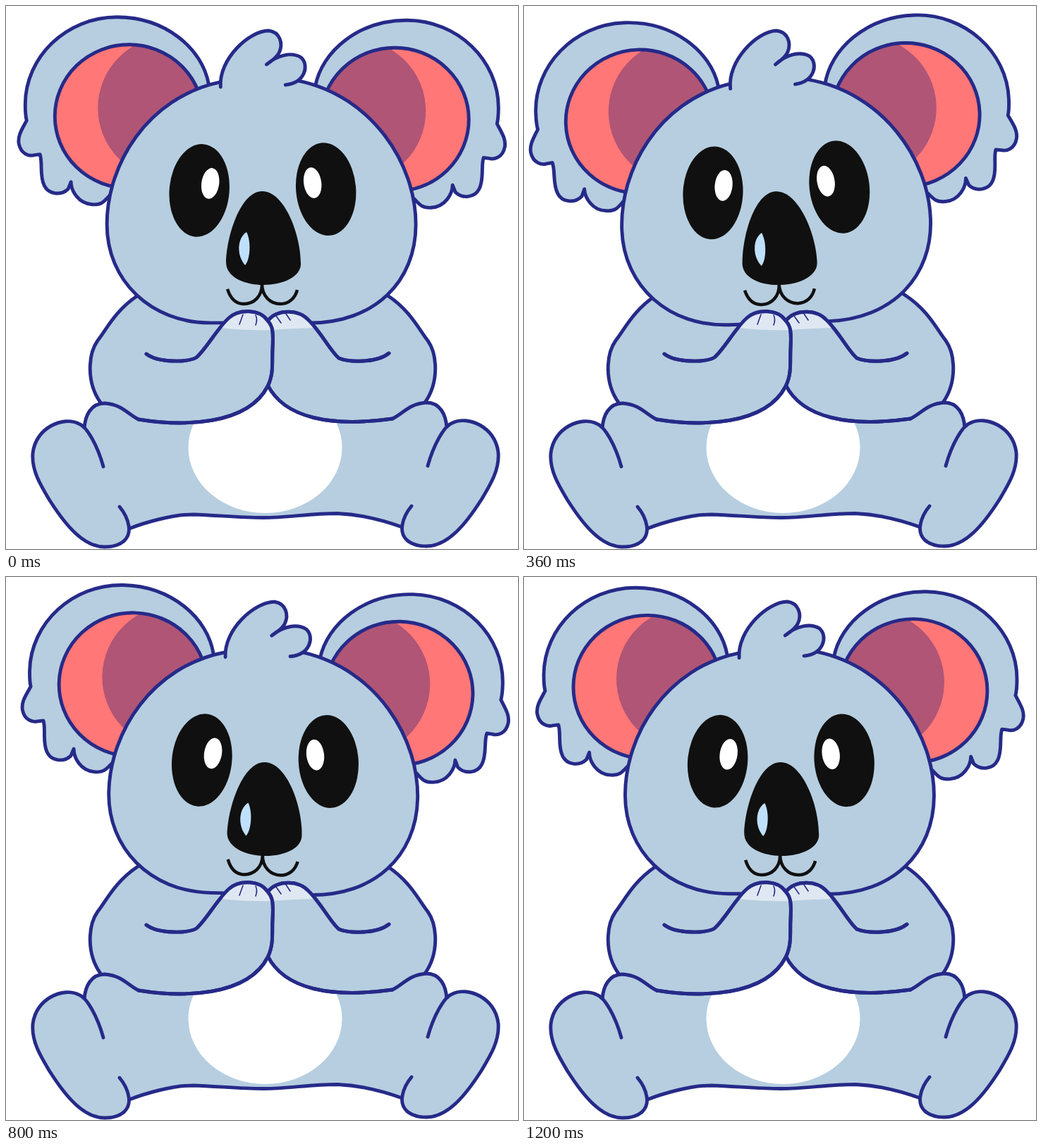
These frames come from a looping animation (726x771 px, 1.22 s). An HTML page:

```html
<!DOCTYPE html>
<html lang="en">
<head>
<meta charset="utf-8">
<title>Koala</title>
<style>
  html, body { margin: 0; height: 100%; overflow: hidden; background: #fff; }
  svg { display: block; width: 726px; height: 771px; }
  .line { stroke: #262a88; stroke-width: 4.9; stroke-linecap: round; stroke-linejoin: round; }
  .fur { fill: #b6cee0; }
  .none { fill: none; }
  .paw { fill: #dfe8f2; stroke: none; }
  .claw { fill: none; stroke-width: 1.6; }
  .black { fill: #101010; }
  .white { fill: #fff; }
</style>
</head>
<body>
<svg viewBox="0 0 726 771">
  <defs>
    <clipPath id="inner"><ellipse cx="174" cy="157" rx="105" ry="102"/></clipPath>
    <g id="ear" class="line">
      <path class="fur" d="M287 111C278 60 225 16 157 16C85 16 27 73 27 140Q27 155 29 163C22 176 16 185 18 196C21 211 33 214 40 212L48 211C52 223 47 241 54 255C60 268 78 270 88 260L92 250C92 262 102 281 122 282C134 283 138 279 146 270"/>
      <ellipse cx="174" cy="157" rx="105" ry="102" fill="#ff7777" stroke="none"/>
      <circle cx="232" cy="145" r="102" fill="#b05575" stroke="none" clip-path="url(#inner)"/>
      <ellipse class="none" cx="174" cy="157" rx="105" ry="102"/>
    </g>
    <g id="leg" class="line fur">
      <path d="M111 600C112 582 120 564 140 564C165 566 172 579 188 587"/>
      <path d="M138 654C130 625 115 597 103 593C82 582 42 598 38 635C36 660 50 682 62 702C85 738 110 768 140 768C165 768 177 755 174 738C172 725 166 717 161 711"/>
    </g>
    <path id="shoulder" class="line none" d="M200 402L187 411C155 432 142 460 130 475C116 495 114 535 134 563"/>
    <path id="armR" d="M548 586C462 598 395 586 371 538L371 447C385 430 415 430 430 447C448 465 460 490 472 500C486 506 526 507 543 493"/>
    <path id="armL" d="M188 587C250 597 342 596 371 540C380 522 377 505 378 487C379 465 379 455 371 447C360 430 330 430 316 443C300 457 284 487 270 499C258 506 216 507 199 494"/>
  </defs>

  <path class="fur" d="M187 411C155 432 142 460 130 475C116 495 114 535 134 563L111 600L175 742C195 734 235 722 265 722C300 723 330 726.5 365 726.5C400 726.5 430 720.5 470 720.5C505 722 540 732 562 740L624 600L595 563C613 535 611 495 597 475C585 460 572 432 540 411Z"/>
  <ellipse class="white" cx="367.5" cy="627" rx="109" ry="93"/>
  <path class="line none" d="M175 742C195 734 235 722 265 722C300 723 330 726.5 365 726.5C400 726.5 430 720.5 470 720.5C505 722 540 732 562 740"/>
  <use href="#shoulder"/>
  <use href="#shoulder" transform="matrix(-1 0 0 1 728 0)"/>

  <g id="head">
    <use href="#ear"/>
    <use href="#ear" transform="matrix(-1 0 0 1 725 4)"/>
    <g class="line fur">
      <path d="M304 108C200 130 143 225 143 310C143 390 205 450 290 450L430 450C523 450 581 391 581 310C581 225 520 128 414 106"/>
      <path d="M304 115C301 75 345 35 372 35C388 37 393 53 387 66C383 74 376 78 369 83C385 69 405 65 418 73C430 84 424 109 396 112"/>
    </g>
    <ellipse class="black" cx="274" cy="262" rx="42.5" ry="66" transform="rotate(5 274 262)"/>
    <ellipse class="black" cx="453.5" cy="260" rx="42.5" ry="66" transform="rotate(-5 453.5 260)"/>
    <ellipse class="white" cx="289.5" cy="252" rx="12.5" ry="22" transform="rotate(8 289.5 252)"/>
    <ellipse class="white" cx="434.5" cy="251" rx="12.5" ry="22" transform="rotate(-8 434.5 251)"/>
    <path class="black" d="M363 263C395 263 418 325 418 366C418 385 392 396 365 396C338 396 312 385 312 364C313 325 333 263 363 263Z"/>
    <path fill="#bfe0fb" d="M341 321C348 335 346 360 339 368C327 355 327 330 341 321Z"/>
    <path class="none" stroke="#101010" stroke-width="4.5" d="M314 402C318 415 325 423 337 423C352 423 363 412 363 395C363 412 375 423 389 423C402 423 410 414 413 403"/>
  </g>

  <g class="line fur">
    <use href="#armR"/>
    <path class="paw" d="M372 460V447C385 430 415 430 430 447L437 457Q405 458 372 460Z"/>
    <use href="#armR" class="none"/>
    <path class="claw" d="M383 440L390 450M397 437L403 446"/>
    <use href="#armL"/>
    <path class="paw" d="M378 460Q377 452 371 447C360 430 330 430 316 443L305 457Q340 461 378 460Z"/>
    <use href="#armL" class="none"/>
    <path class="claw" d="M336 438L331 452M354 439Q357 445 354 453"/>
  </g>
  <use href="#leg"/>
  <use href="#leg" transform="matrix(-1 0 0 1 736 -1)"/>
</svg>
<script>
  const LOOP = 1220, STEP = 20;
  const LEFT = { time: 328, angle: -2.3 }, RIGHT = { time: 922, angle: 2.2 };
  const head = document.getElementById('head');

  // Linear swing between the two extremes, wrapping around the loop.
  function tilt(t) {
    const rise = RIGHT.time - LEFT.time;
    const since = (t - LEFT.time + LOOP) % LOOP;
    const k = since < rise ? since / rise : (LOOP - since) / (LOOP - rise);
    return LEFT.angle + (RIGHT.angle - LEFT.angle) * k;
  }

  const start = performance.now();
  function draw() {
    const t = Math.floor((performance.now() - start) % LOOP / STEP) * STEP;
    head.setAttribute('transform', `rotate(${tilt(t)} 365 432)`);
    requestAnimationFrame(draw);
  }
  draw();
</script>
</body>
</html>
```
